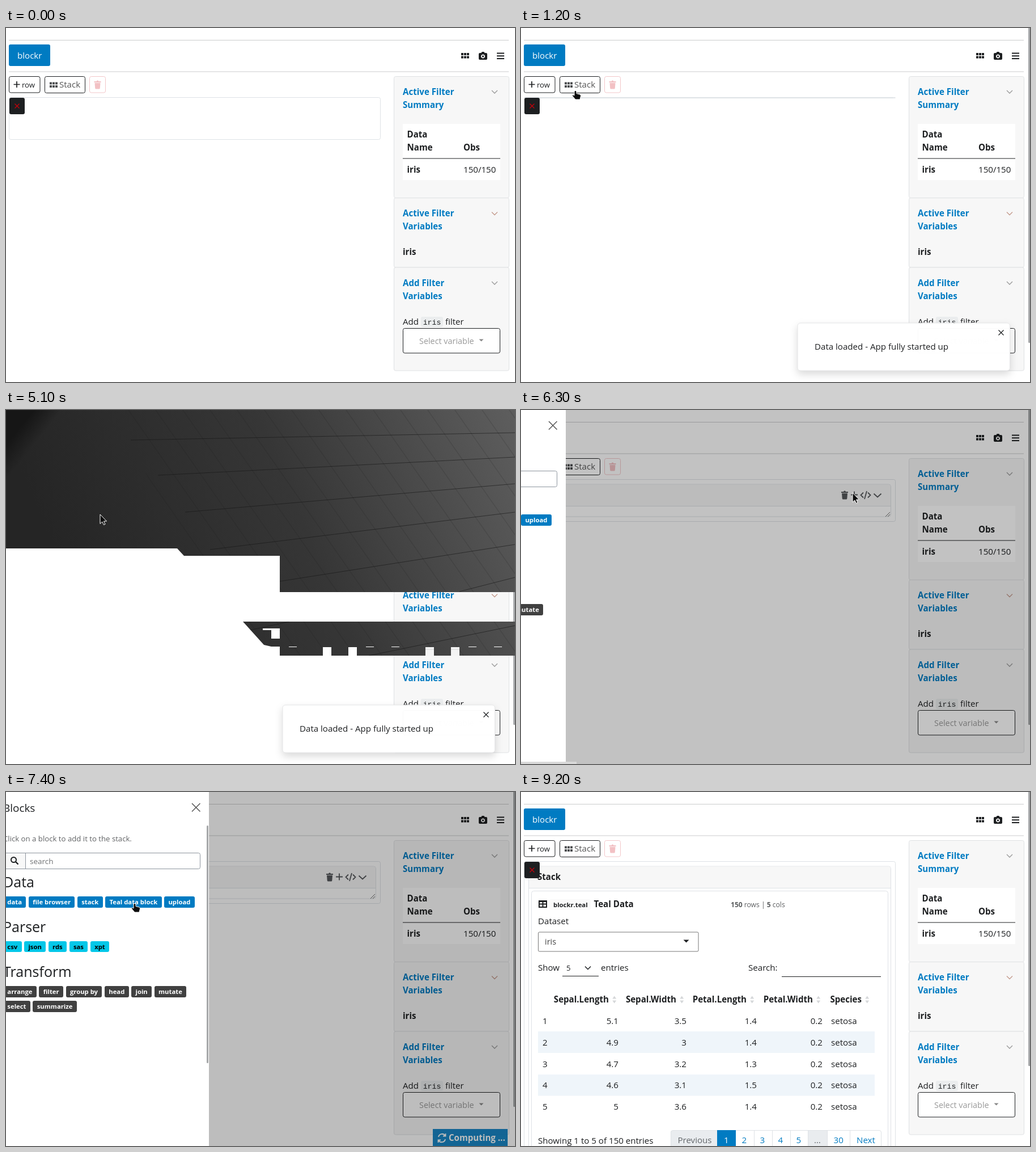
These frames come from a looping animation (898 by 624 pixels, 9.5 s). An HTML page:

```html
<!DOCTYPE html>
<html lang="en">
<head>
<meta charset="utf-8">
<title>Block dashboard</title>
<style>
html, body { margin: 0; width: 100%; height: 100%; overflow: hidden; background: #fff; }
#stage { position: absolute; left: 0; top: 0; width: 898px; height: 624px; overflow: hidden; background: #fff; }
svg { position: absolute; left: 0; top: 0; display: block; }
text, .badges { font-family: "Open Sans", "Noto Sans", sans-serif; }
text { font-size: 15.1px; fill: #1d1f21; white-space: pre; }
.b { font-weight: 700; }
.blue { fill: #007bc2; }
.sm { font-size: 13.2px; }
.end { text-anchor: end; }
.ink { fill: #1d1f21; }
.line { fill: none; stroke: #1d1f21; }
.edge { fill: #fff; stroke: #dee2e6; }
.side { fill: #f7f7f7; stroke: #dfe1e3; }
.chev { fill: none; stroke: #999; stroke-width: 1.3; }

/* one loop; percentages are ms / 95 */
.a { animation: 9500ms step-end infinite; }
#row { animation-name: row; }
#card { animation-name: card; }
#cardBox { animation-name: cardBox; }
#tools { animation-name: tools; }
#block { animation-name: block; }
#ghost { animation-name: ghost; }
#bar { animation-name: bar; }
#toast { animation-name: toast; }
#wallFull { animation-name: wallFull; }
#wallCut { animation-name: wallCut; }
#wallTop { animation-name: wallTop; }
#shade { animation-name: shade; }
#panel { animation-name: panel; }
#panelBar { animation-name: panelBar; }
#busy { animation-name: busy; }
#status { animation-name: status; }
#cursor { animation-name: cursor; }
#arrow { animation-name: arrow; }
#hand { animation-name: hand; }
#grab { animation-name: grab; }

@keyframes row {
  0% { height: 74px; }
  4.2% { height: 74px; animation-timing-function: steps(4); }
  8.42% { height: 1px; }
  20% { height: 1px; animation-timing-function: steps(3); }
  23.15% { height: 74px; }
  81.05%, 100% { height: 520px; }
}
@keyframes card { 0% { opacity: 0; } 42.1%, 100% { opacity: 1; } }
@keyframes cardBox { 0% { height: 57px; } 81.05%, 100% { height: 510px; } }
@keyframes tools { 0% { opacity: 0; } 56.8% { opacity: 1; } 92.6%, 100% { opacity: 0; } }
@keyframes block { 0% { opacity: 0; } 81.05%, 100% { opacity: 1; } }
@keyframes ghost {
  0% { opacity: 0; transform: none; }
  31.57% { opacity: .5; transform: none; animation-timing-function: steps(7); }
  38.94% { opacity: .5; transform: translate(197px, 75.5px); }
  42.1%, 100% { opacity: 0; transform: none; }
}
@keyframes bar {
  0% { opacity: 0; height: 557px; }
  3.15% { opacity: 1; height: 557px; }
  81.05%, 100% { opacity: 1; height: 485px; }
}
@keyframes toast {
  0% { opacity: 0; }
  4.2% { opacity: 0; animation-timing-function: steps(5); }
  9.47% { opacity: 1; }
  60% { opacity: 1; animation-timing-function: steps(4); }
  64.2%, 100% { opacity: 0; }
}
@keyframes wallFull { 0% { opacity: 0; } 45.26% { opacity: 1; } 53.68%, 100% { opacity: 0; } }
@keyframes wallCut { 0% { opacity: 0; } 53.68% { opacity: 1; } 54.73%, 100% { opacity: 0; } }
@keyframes wallTop {
  0% { clip-path: inset(0 0 100% 0); }
  54.73% { clip-path: inset(0 0 50% 0); }
  55.78% { clip-path: inset(0 0 75% 0); }
  56.84%, 100% { clip-path: inset(0 0 100% 0); }
}
@keyframes shade {
  0% { opacity: 0; }
  65.26% { opacity: .06; }
  66.31% { opacity: .24; }
  67.36% { opacity: .4; }
  77.89% { opacity: .26; }
  78.94%, 100% { opacity: 0; }
}
@keyframes panel {
  0% { transform: translateX(-400px); }
  66.31% { transform: translateX(-291px); }
  67.36% { transform: translateX(-70px); }
  68.42% { transform: translateX(-4px); }
  69.47% { transform: none; }
  77.89% { transform: translateX(-12px); }
  78.94% { transform: translateX(-130px); }
  80% { transform: translateX(-335px); }
  81.05%, 100% { transform: translateX(-400px); }
}
@keyframes panelBar { 0% { opacity: 0; } 70.52%, 100% { opacity: 1; } }
@keyframes busy { 0% { opacity: 0; } 77.89% { opacity: .9; } 83.15%, 100% { opacity: 0; } }
@keyframes status { 0% { opacity: 0; } 65.26% { opacity: 1; } 69.47%, 100% { opacity: 0; } }
@keyframes cursor {
  0% { transform: translate(-60px, 0); }
  5.26% { transform: translate(420px, 330px); animation-timing-function: steps(7); }
  12.63% { transform: translate(96px, 110px); }
  14.73% { transform: translate(96px, 110px); animation-timing-function: steps(3); }
  17.89% { transform: translate(77px, 130px); }
  23.15% { transform: translate(-60px, 0); }
  25.26% { transform: translate(66px, 124px); }
  27.36% { transform: translate(92px, 92px); }
  31.57% { transform: translate(92px, 92px); animation-timing-function: steps(7); }
  38.94% { transform: translate(289px, 163px); }
  42.1% { transform: translate(-60px, 0); }
  49.47% { transform: translate(166px, 184px); }
  53.68% { transform: translate(166px, 184px); animation-timing-function: steps(4); }
  57.89% { transform: translate(585px, 146px); }
  66.31% { transform: translate(585px, 146px); animation-timing-function: steps(3); }
  69.47% { transform: translate(350px, 300px); animation-timing-function: steps(3); }
  72.63% { transform: translate(165px, 230px); animation-timing-function: steps(3); }
  75.78% { transform: translate(227px, 196px); }
  77.89% { transform: translate(227px, 196px); animation-timing-function: steps(6); }
  84.21% { transform: translate(300px, 440px); }
  87.36% { transform: translate(300px, 440px); animation-timing-function: steps(9); }
  96.84%, 100% { transform: translate(560px, -40px); }
}
@keyframes arrow {
  0% { opacity: 1; }
  12.63% { opacity: 0; }
  15.78% { opacity: 1; }
  27.36% { opacity: 0; }
  42.1% { opacity: 1; }
  75.78% { opacity: 0; }
  78.94%, 100% { opacity: 1; }
}
@keyframes hand {
  0% { opacity: 0; }
  12.63% { opacity: 1; }
  15.78% { opacity: 0; }
  27.36% { opacity: 1; }
  30.52% { opacity: 0; }
  75.78% { opacity: 1; }
  78.94%, 100% { opacity: 0; }
}
@keyframes grab { 0% { opacity: 0; } 30.52% { opacity: 1; } 42.1%, 100% { opacity: 0; } }

#panel { position: absolute; left: -8px; top: 0; width: 378px; height: 624px; background: #fff; }
.badges { position: absolute; left: 15px; display: flex; gap: 4.5px; font-size: 11.3px; font-weight: 700; color: #fff; }
.badges span { height: 19.6px; line-height: 19.6px; padding: 0 7.35px; border-radius: 3px; background: #404040; white-space: pre; }
.data span { background: #007bc2; }
.parse span { background: #03c7e8; color: #000; }
</style>
</head>
<body>
<div id="stage">
<svg width="898" height="624" viewBox="0 0 898 624">
  <defs>
    <path id="dots" d="M0 0h4v4h-4zM5 0h4v4h-4zM10 0h4v4h-4zM0 5.5h4v4h-4zM5 5.5h4v4h-4zM10 5.5h4v4h-4z"/>
    <path id="down" d="M-5 -2.5L0 2.5L5 -2.5"/>
    <path id="bin" d="M-6 -6h4l1 -1.5h2l1 1.5h4v2h-12zM-5 -3.3h10l-.7 9.3q-.1 1.5 -1.5 1.5h-5.6q-1.4 0 -1.5 -1.5z"/>
    <path id="sort" d="M-3.5 -1.5L0 -6.5L3.5 -1.5zM-3.5 1.5L0 6.5L3.5 1.5z" fill="#d5d7d9"/>
    <g id="stackBtn">
      <rect x="68.5" y="85.5" width="71" height="29" rx="3" fill="#fff" stroke="#1d1f21"/>
      <use href="#dots" x="77" y="95.5" fill="#4c4e50"/>
      <text x="94" y="105" style="fill:#555">Stack</text>
    </g>
    <linearGradient id="dark" gradientUnits="userSpaceOnUse" x1="120" y1="330" x2="898" y2="0">
      <stop offset="0" stop-color="#252525"/><stop offset=".5" stop-color="#363636"/><stop offset="1" stop-color="#5e5e5e"/>
    </linearGradient>
    <linearGradient id="corner" gradientUnits="userSpaceOnUse" x1="0" y1="0" x2="60" y2="48">
      <stop offset=".5" stop-color="#161616"/><stop offset="1" stop-color="#161616" stop-opacity="0"/>
    </linearGradient>
    <pattern id="slats" width="48" height="500" patternUnits="userSpaceOnUse" patternTransform="skewX(35)">
      <path d="M24 0V500" stroke="#111" stroke-opacity=".28"/>
    </pattern>
    <clipPath id="full"><path d="M0 0H898V433H483L455 414L302 244H0z"/></clipPath>
    <clipPath id="cut"><path d="M0 0H898V321H483V257H314L302 244H0zM418 373H898V433H483V417H468L455 414z"/></clipPath>
    <g id="wall">
      <rect width="898" height="433" fill="url(#dark)"/>
      <path d="M200 0H898V433H483L302 244z" fill="url(#slats)"/>
      <path d="M220 53L898 40M268 115L898 83M316 180L898 130M360 246L898 180M483 302L898 237M800 320L898 295M430 388L500 373M640 433L898 380" fill="none" stroke="#161616" stroke-opacity=".6"/>
      <path d="M0 0H100L0 124z" fill="url(#corner)"/>
    </g>
  </defs>

  <path d="M5 21.5H887M5 77H887" stroke="#cbcccd" fill="none"/>
  <rect x="5" y="29" width="73" height="38" rx="3" class="blue"/>
  <text x="20" y="54" style="fill:#fff">blockr</text>
  <use href="#dots" x="803" y="44" class="ink"/>
  <path class="ink" fill-rule="evenodd" d="M836 44h2.500l1 -2h4l1 2h2.500q2 0 2 2v8q0 2 -2 2h-11q-2 0 -2 -2v-8q0 -2 2 -2zM841.500 46.500a3.500 3.500 0 1 0 .01 0zM841.500 48.300a1.700 1.700 0 1 1 -.01 0z"/>
  <path class="line" stroke-width="2" d="M866 44.500h13M866 49.300h13M866 54h13"/>

  <rect x="5.500" y="85.500" width="54.500" height="28.500" rx="3" class="line"/>
  <path d="M13.500 99.500h11M19 94v11" class="line" stroke-width="1.700"/>
  <text x="28" y="105" class="sm">row</text>
  <use href="#stackBtn"/>
  <g opacity=".32">
    <rect x="147.500" y="85.500" width="28" height="28.500" rx="3" fill="none" stroke="#d9505b"/>
    <use href="#bin" x="161.500" y="100" fill="#d9404c"/>
  </g>

  <rect id="row" class="a edge" x="5.500" y="122.500" width="655" height="74" rx="3"/>
  <g id="card" class="a">
    <rect id="cardBox" class="a edge" x="13.500" y="131" width="639" height="57" rx="4"/>
    <path d="M14 169.500V135q0 -3.500 3.500 -3.500H648.500q3.500 0 3.500 3.500V169.500z" fill="#f7f7f7"/>
    <path d="M14 169.500H652" stroke="#dee2e6"/>
    <text x="29" y="155" class="b">Stack</text>
    <g id="tools" class="a">
      <use href="#bin" x="571" y="150" fill="#55585b"/>
      <path d="M582 149.500h12M588 143.500v12M604 145.500l-4.500 4.500 4.500 4.500M612 145.500l4.500 4.500 -4.500 4.500M610 143l-4 14M622.500 147.500l6.500 6 6.500 -6" fill="none" stroke="#55585b" stroke-width="1.800"/>
    </g>
    <path d="M643 188l8 -8M647 188l4 -4" stroke="#666" fill="none"/>
  </g>

  <g id="block" class="a">
    <rect x="14" y="170" width="638" height="454" fill="#fff"/>
    <rect class="edge" x="18.500" y="174.500" width="629" height="470" rx="4"/>
    <path class="line" stroke-width="2" d="M32 192h13v11h-13zM32 197.500h13M38.500 193v10"/>
    <path class="line" stroke-width="3" d="M31 192.500h15"/>
    <rect x="50" y="189" width="73" height="19" rx="3" fill="#fafafa"/>
    <text x="57" y="202.500" class="b" style="font-size:11.300px">blockr.teal</text>
    <text x="128.500" y="203" class="b">Teal Data</text>
    <text x="370" y="203" style="font-size:12.100px;fill:#5c5e60"><tspan class="b">150</tspan> rows | <tspan class="b">5</tspan> cols</text>
    <text x="30" y="233">Dataset</text>
    <rect class="line" x="30.500" y="247" width="282.500" height="34" rx="2" style="stroke:#777"/>
    <text x="42" y="269" style="font-size:14.400px;fill:#444">iris</text>
    <path class="ink" d="M286.500 260.500h10l-5 5z"/>
    <text x="30" y="315">Show</text>
    <text x="80" y="315" class="sm">5</text>
    <use href="#down" x="118" y="310" class="line" stroke-width="1.500"/>
    <text x="141" y="315">entries</text>
    <text x="401" y="315">Search:</text>
    <path class="line" d="M73 324.500H137M460 325.500H635"/>
    <path d="M30 422H624V460H30zM30 498H624V535.500H30z" fill="#eff5fa"/>
    <g id="table"></g>
    <text x="30" y="619.500">Showing 1 to 5 of 150 entries</text>
    <path d="M264 624V600q0 -3 3 -3H346V624zM506 597h34v27h-34z" fill="#e9ecef"/>
    <path d="M264.500 624V600q0 -3.500 3.500 -3.500H632q3.500 0 3.500 3.500V624M411.500 597v27M443.500 597v27M475.500 597v27M506.500 597v27M540.500 597v27M580.500 597v27" fill="none" stroke="#dee2e6"/>
    <rect x="346" y="596" width="33" height="28" class="blue"/>
    <text x="276.500" y="619" style="fill:#63676b">Previous</text>
    <text x="358" y="619" style="fill:#fff">1</text>
    <text y="619" class="blue"><tspan x="389.500">2</tspan><tspan x="421.500">3</tspan><tspan x="453.500">4</tspan><tspan x="485.500">5</tspan><tspan x="551.500">30</tspan><tspan x="592">Next</tspan></text>
    <text x="517" y="619" style="fill:#63676b">…</text>
  </g>

  <rect x="6" y="123" width="27" height="29" rx="3" class="ink"/>
  <path d="M15.500 133.500l8 8M23.500 133.500l-8 8" stroke="#c4000a" stroke-width="1.300"/>
  <use id="ghost" class="a" href="#stackBtn"/>

  <g>
    <rect class="side" x="684.500" y="85.500" width="203" height="214" rx="3"/>
    <rect class="side" x="684.500" y="299.500" width="203" height="122.500" rx="3"/>
    <rect class="side" x="684.500" y="422" width="203" height="182" rx="3"/>
    <text class="b blue"><tspan x="700" y="118">Active Filter</tspan><tspan x="700" y="140.500">Summary</tspan><tspan x="700" y="332">Active Filter</tspan><tspan x="700" y="355">Variables</tspan><tspan x="700" y="455">Add Filter</tspan><tspan x="700" y="477.500">Variables</tspan></text>
    <use href="#down" x="862" y="112.500" class="chev"/>
    <use href="#down" x="862" y="327" class="chev" style="stroke:#c49a8c"/>
    <use href="#down" x="862" y="449.500" class="chev"/>
    <rect x="700" y="169" width="172" height="99" fill="#fff"/>
    <path d="M700 230H872" class="line"/>
    <text class="b"><tspan x="707.500" y="193">Data</tspan><tspan x="707.500" y="216">Name</tspan><tspan x="807" y="216">Obs</tspan><tspan x="707.500" y="255">iris</tspan><tspan x="700" y="400">iris</tspan></text>
    <text x="807" y="255">150/150</text>
    <text x="700" y="523">Add</text>
    <rect x="732" y="509" width="39" height="18" rx="3" fill="#ebedee"/>
    <text x="735.700" y="523" class="sm" style="font-family:'Liberation Mono',monospace">iris</text>
    <text x="775" y="523">filter</text>
    <rect x="700.500" y="529.500" width="171" height="43.500" rx="3" fill="#fff" stroke="#1d1f21"/>
    <text x="729" y="557" style="font-size:14.400px;fill:#999">Select variable</text>
    <path d="M834.500 548.500h8l-4 4z" fill="#888"/>
  </g>

  <rect id="bar" class="a" x="895" y="-2" width="5" height="557" rx="1.500" fill="#a6a8aa"/>
  <g id="toast" class="a">
    <rect x="488" y="520" width="374.500" height="84" rx="5" fill="#fff" fill-opacity=".98" stroke="#e4e5e6" style="filter:drop-shadow(0 6px 7px rgba(0,0,0,.15))"/>
    <path d="M842.500 532.500l9 9M851.500 532.500l-9 9" class="line" stroke-width="1.300"/>
    <text x="518" y="567">Data loaded - App fully started up</text>
  </g>

  <g id="wallFull" class="a"><use href="#wall" clip-path="url(#full)"/></g>
  <g id="wallCut" class="a">
    <use href="#wall" clip-path="url(#cut)"/>
    <path d="M453 385h30v18h-15v-15h-15zM499 417h14v1h-14zM635 417h14v1h-14zM680 417h14v1h-14zM816 417h14v1h-14zM861 417h14v1h-14zM559 418h15v15h-15zM604 418h15v15h-15z" fill="#fff"/>
    <path d="M740 418h15v15h-15zM785 418h15v15h-15z" fill="#f4f4f4"/>
    <path d="M740 422h15M785 422h15" stroke="#d5d5d5"/>
  </g>
  <g id="wallTop" class="a"><use href="#wall"/></g>

  <g id="busy" class="a">
    <rect x="753" y="594" width="132" height="30" fill="#007bc2"/>
    <path d="M763 608a6.500 6.500 0 0 1 12 -2M775 612a6.500 6.500 0 0 1 -12 2M775.500 602v4.500h-4.500M762.500 618v-4.500h4.500" fill="none" stroke="#fff" stroke-width="1.800"/>
    <text x="781" y="615" class="b" style="fill:#fff">Computing ...</text>
  </g>
  <rect id="shade" class="a" width="898" height="624"/>
</svg>

<div id="panel" class="a">
  <svg width="378" height="624" viewBox="0 0 378 624">
    <text x="15" y="34.500" style="font-size:18.900px">Blocks</text>
    <path d="M348 20l14.500 14.500M362.500 20l-14.500 14.500" fill="none" stroke="#555" stroke-width="1.500"/>
    <text x="15" y="87" class="sm" style="fill:#606264">Click on a block to add it to the stack.</text>
    <rect x="15.500" y="107.500" width="347" height="28" rx="3" fill="#fff" stroke="#8d959e"/>
    <path d="M16 108h38v27h-38z" fill="#f8f8f8"/>
    <path d="M54.500 107.500v28" stroke="#8d959e"/>
    <circle cx="33.500" cy="119.500" r="4.500" class="line" stroke-width="2"/>
    <path d="M37 123l4.500 4.500" class="line" stroke-width="2.400"/>
    <text x="62" y="126.500" style="font-size:13.500px;fill:#6f7173">search</text>
    <text style="font-size:25px"><tspan x="15" y="167.500">Data</tspan><tspan x="15" y="247">Parser</tspan><tspan x="15" y="325.500">Transform</tspan></text>
    <rect id="panelBar" class="a" x="374" y="59" width="3" height="419" rx="1.500" fill="#a6a8aa"/>
  </svg>
  <div class="badges data" style="top:184px"><span>data</span><span>file browser</span><span>stack</span><span>Teal data block</span><span>upload</span></div>
  <div class="badges parse" style="top:262.500px"><span>csv</span><span>json</span><span>rds</span><span>sas</span><span>xpt</span></div>
  <div class="badges" style="top:342px"><span>arrange</span><span>filter</span><span>group by</span><span>head</span><span>join</span><span>mutate</span></div>
  <div class="badges" style="top:368px"><span>select</span><span>summarize</span></div>
</div>

<svg width="898" height="624" viewBox="0 0 898 624">
  <rect id="status" class="a" y="620" width="98" height="4" fill="#d9d9d9"/>
  <g id="cursor" class="a" stroke="#fff" stroke-linejoin="round" fill="#0c0c0c">
    <path id="arrow" class="a" d="M0 0V16.500L3.800 13L6.500 18.500L9 17.300L6.500 12H11.500z"/>
    <path id="hand" class="a" d="M-2 2Q0 -1.500 2 2V5.500L8 7Q10 7.500 9.500 10L8 16H0L-5.500 9.500Q-5 7 -2 9z"/>
    <g id="grab" class="a">
      <path d="M-3 3Q-2 -1 0 1Q2 -1.500 3.500 1Q6 0 6.500 2.500Q8.500 2.500 8.500 5L7.500 12H-1L-5 8Q-5 5.500 -3 6.500z"/>
      <path d="M6 9h8l-2.500 2.500 3 5 -2 1.500 -3 -4 -2.500 2.500z"/>
    </g>
  </g>
</svg>
</div>
<script>
const table = document.getElementById('table');

function put(x, y, label, cls = '') {
  const el = document.createElementNS('http://www.w3.org/2000/svg', 'text');
  el.setAttribute('x', x);
  el.setAttribute('y', y);
  el.setAttribute('class', cls);
  el.textContent = label;
  table.append(el);
}

function sortMark(x) {
  const el = document.createElementNS('http://www.w3.org/2000/svg', 'use');
  el.setAttribute('href', '#sort');
  el.setAttribute('x', x);
  el.setAttribute('y', 366);
  table.append(el);
}

const heads = [['Sepal.Length', 155], ['Sepal.Width', 274], ['Petal.Length', 398], ['Petal.Width', 515], ['Species', 601]];
for (const [name, right] of heads) {
  put(right, 371, name, 'b end');
  sortMark(right + 9.7);
}

const rights = [172, 292, 416, 532];
const rows = ['5.1 3.5 1.4 0.2', '4.9 3 1.4 0.2', '4.7 3.2 1.3 0.2', '4.6 3.1 1.5 0.2', '5 3.6 1.4 0.2'];
rows.forEach((row, i) => {
  const y = 409 + i * 37.75;
  put(38, y, i + 1);
  row.split(' ').forEach((value, k) => put(rights[k], y, value, 'end'));
  put(547, y, 'setosa');
});
</script>
</body>
</html>
```
